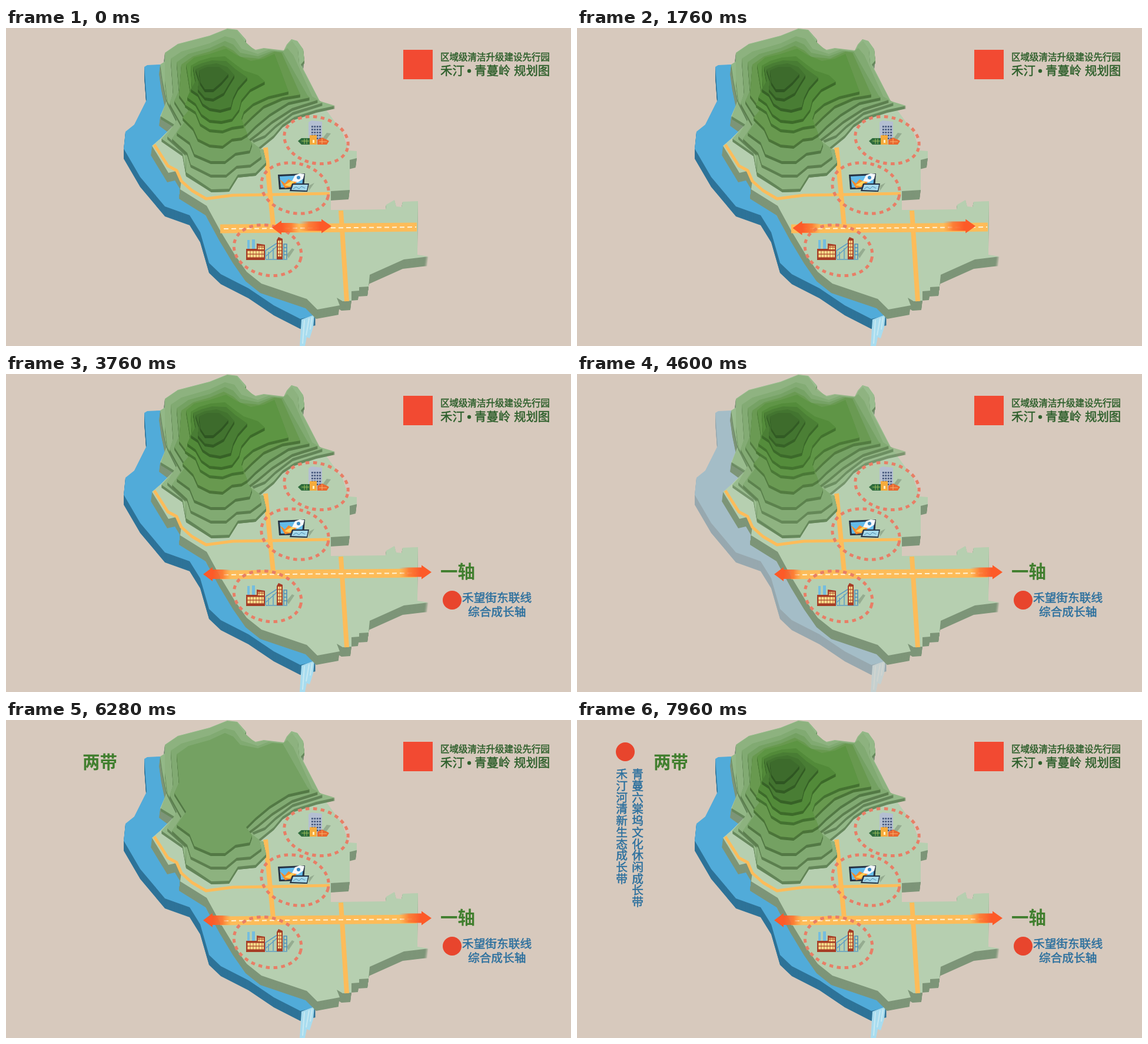
Write an HTML page that moves like this. It is 960 px wide and 540 px high and loops after 8 s.

```html
<!DOCTYPE html>
<html lang="zh-CN">
<head>
<meta charset="utf-8">
<title>规划图</title>
<style>
  html, body { margin: 0; width: 100%; height: 100%; overflow: hidden; background: #d7c9bd; }
  svg { display: block; width: 100vw; height: 100vh; font-family: 'Noto Sans CJK SC', 'Noto Sans CJK', sans-serif; }
  .road { fill: none; stroke: #fdbc59; stroke-linejoin: round; }
  .zone { fill: none; stroke: #e87e66; stroke-width: 5; stroke-dasharray: 6.5 6.5; }
  .title { fill: #2d5f2b; stroke: #2d5f2b; stroke-width: .5px; }
  .heading { fill: #417f2f; font-size: 29.5px; font-weight: 700; }
  .label { fill: #2c709e; font-size: 19.7px; }
  .label text { stroke: #2c709e; stroke-width: .5px; }
  .column { writing-mode: vertical-rl; }
  .mark { fill: #e8452d; }
</style>
</head>
<body>
<svg viewBox="0 0 960 540">
  <defs>
    <linearGradient id="fade">
      <stop offset="0" stop-color="#ff8a35" stop-opacity="0"/>
      <stop offset=".3" stop-color="#fc7430" stop-opacity=".85"/>
      <stop offset=".65" stop-color="#fd5a28"/>
    </linearGradient>
    <pattern id="windows" width="5" height="6" patternUnits="userSpaceOnUse">
      <rect x=".4" y=".6" width="4.200" height="4.800" fill="#f8df8c"/>
    </pattern>
    <pattern id="panes" x="519" y="166" width="4.400" height="5" patternUnits="userSpaceOnUse">
      <rect width="2.800" height="3" fill="#4c5d82"/>
    </pattern>
  </defs>

  <g id="river">
    <path data-depth="17" data-side="#2e7398" fill="#51abd9" d="M235 66L240 63 262 62 285 180 340 320 420 440 512 474 526 488 500 494 455 471 412 442 365 418 345 399 330 347 312 318 270 303 228 253 200 205 203 176 218 164 239 122Z"/>
    <path fill="#a8dcef" d="M502 495L524 487 522 508 516 527 511 525 508 540 499 540Z"/>
    <path fill="none" stroke="#c8e9f2" stroke-width="2" d="M507 496L504 536M515 493L510 522M520 491L517 512"/>
  </g>

  <path data-depth="16" data-slant="-2" data-side="#7d9578" fill="#b6cfb0" d="M262 62L270 57 270 42 292 27 346 13 376 1 393 3 408 20 404 26 424 37 472 38 485 19 495 22 505 36 507 55 501 62 533 124 552 150 572 178 582 208 596 209 596 221 584 224 584 275 552 277 552 309 645 308 646 300 660 292 663 303 672 304 674 295 700 294 699 385 718 388 676 393 618 419 616 439 600 440 600 446 587 447 587 463 572 464 562 458 567 471 529 478 511 460 434 434 409 414 388 384 365 346 341 302 296 274 298 258 289 243 276 246 248 200 262 188 284 166 262 150 273 124 266 90Z"/>

  <g class="road">
    <path stroke-width="5" d="M252 198L275 234 290 242 298 260 316 276 340 290 385 284 450 283 550 281"/>
    <path stroke-width="8" d="M441 203L454 336M569 310L579 464"/>
    <path stroke-width="15" d="M364 341L698 338"/>
    <path stroke="#fff3d6" stroke-width="2" stroke-dasharray="8 5" d="M370 341L697 338"/>
  </g>

  <g id="mountain">
    <path fill="#93b887" d="M262 62L270 57 270 42 292 27 346 13 376 1 393 3 408 20 404 26 424 37 438 34 472 38 477 28 485 19 495 22 505 36 507 55 501 62 533 124 559 132 527 139 490 151 470 164 455 182 428 204 437 206 442 228 424 246 394 249 379 273 349 274 306 247 300 213 264 188 286 164 263 150 273 124 266 90Z"/>
    <path fill="#8db27f" d="M270 43L292 28 346 14 376 2 392 4 405 22 424 39 438 35 473 39 479 28 486 22 496 36 498 60 531 122 538 127 487 143 458 165 440 182 418 191 430 206 437 206 442 228 424 246 394 249 379 273 349 274 306 245 305 212 274 184 290 156 274 124 270 90Z"/>
    <path fill="#81aa72" d="M280 52L298 40 346 26 372 14 388 18 400 35 428 44 446 37 470 40 478 34 488 46 520 116 530 122 486 136 452 158 428 178 412 190 430 203 434 218 415 232 392 234 374 249 348 249 314 232 308 212 282 188 298 164 278 128 284 110Z"/>
    <path fill="#74a162" d="M290 58L310 44 346 34 372 22 386 28 398 42 428 48 452 39 470 40 512 114 516 118 480 126 448 146 424 166 408 182 418 196 414 208 390 212 372 226 348 226 320 214 312 194 290 178 306 156 286 124 294 106Z"/>
    <path fill="#68994f" d="M298 62L318 48 346 40 370 30 386 38 398 49 430 52 456 40 468 42 500 113 470 118 438 132 418 150 404 164 410 180 400 186 384 188 368 200 346 198 326 188 318 170 300 152 312 138 294 114Z"/>
    <path fill="#5d9543" d="M306 62L320 50 346 44 374 35 392 46 416 56 438 52 456 44 466 70 480 108 446 116 420 128 404 142 400 154 404 165 384 168 368 174 346 172 330 162 322 142 304 130 314 112Z"/>
    <path fill="#528a39" d="M314 64L328 56 348 50 372 48 390 62 404 72 428 80 440 91 415 104 400 122 396 138 384 154 366 158 346 156 332 146 322 128 308 118 316 100Z"/>
    <path fill="#497d34" d="M318 66L332 60 350 55 374 56 390 70 410 84 394 102 386 118 382 134 364 139 346 136 334 128 326 112 314 104 322 90Z"/>
    <path fill="#42732f" d="M322 70L338 63 358 60 376 66 388 80 378 96 370 110 352 120 338 118 326 104 328 88Z"/>
    <path fill="#3d6b2c" d="M328 72L342 66 362 66 378 78 366 92 352 104 338 104 330 92Z"/>
  </g>

  <g class="zone">
    <ellipse rx="55" ry="39" transform="translate(527 190.500) rotate(14)"/>
    <ellipse rx="58" ry="42" transform="translate(491 272) rotate(14)"/>
    <ellipse rx="58" ry="42" transform="translate(444.500 377.500) rotate(14)"/>
  </g>

  <g id="office">
    <path fill="#7f957c" opacity=".6" d="M536 190L545 178 552 179 540 195Z"/>
    <path fill="#b4bfd2" d="M514 160L519 157 537 159V196H514Z"/>
    <path fill="url(#panes)" d="M519 166H536V190H519Z"/>
    <path fill="#2f6b3c" d="M496 192L502 187H516V198H502Z"/>
    <path stroke="#9fc25c" d="M502 192H515M507 188V197M511 188V197"/>
    <path fill="#f6ab3c" d="M516 182H528V198H516Z"/>
    <path fill="#fff0c2" d="M521 190H524V195H521Z"/>
    <path fill="#e9682f" d="M529 190L537 186 546 190 549 192 545 198H529Z"/>
    <path stroke="#f7b36e" d="M532 193H545M537 188V197"/>
  </g>

  <g id="screens">
    <path fill="#7f957c" opacity=".6" d="M514 268L524 263 515 276Z"/>
    <path fill="#263345" d="M462 249L508 247 506 273 464 274Z"/>
    <path fill="#63bbea" d="M465 252L505 250 503 270 467 271Z"/>
    <path fill="#f78c2a" d="M465 257L474 264 480 257 486 260 491 255 494 262 484 270 474 272Z"/>
    <path fill="#ffd35a" d="M473 267L485 260 490 261 482 269Z"/>
    <path fill="#f5f8fb" d="M486 260L491 250 499 247 507 248 505 256 496 262Z"/>
    <circle cx="497" cy="254" r="3" fill="#3d8bc5"/>
    <path fill="#263345" d="M486 264L515 264 512 278 482 277Z"/>
    <path fill="#a5d8ea" d="M488 266L513 266 511 276 485 275Z"/>
    <path fill="none" stroke="#4b8fb5" d="M488 273L493 270 498 273 502 269 508 272"/>
  </g>

  <g id="factory">
    <path fill="#7f957c" opacity=".6" d="M477 385L486 374 490 376 480 391Z"/>
    <path fill="#74bddf" d="M410 360H414V377H410ZM418 359H423V377H418Z"/>
    <path fill="#a63c25" d="M408 375H426V366L440 368V394H408Z"/>
    <path fill="url(#windows)" d="M410 378H438V390H410ZM428 370H438V376H428Z"/>
    <path fill="none" stroke="#5f9fc3" stroke-width="1.500" d="M441 392V378L461 365M441 388L461 370M446 392V380M454 392V374M441 393H478"/>
    <path fill="#a63c25" d="M460 360L463 355 470 358V393H460Z"/>
    <path fill="url(#windows)" d="M462 361H468V388H462Z"/>
    <path fill="none" stroke="#4d8fb8" stroke-width="1.500" d="M472 392V367H477V392M472 373H477M472 379H477M472 385H477"/>
  </g>

  <path id="west" fill="url(#fade)" d="M-47 -8H-16V-12L0 0-16 12V8H-47Z"/>
  <path id="east" fill="url(#fade)" d="M-55 -8H-17V-12L0 0-17 12V8H-55Z"/>

  <rect x="675" y="37" width="50" height="50" fill="#f24a32"/>
  <g class="title">
    <text x="738" y="55" font-size="15.500">区域级清洁升级建设先行园</text>
    <g font-size="20.400">
      <text x="738" y="80">禾汀</text>
      <circle cx="787" cy="73" r="3"/>
      <text x="796" y="80">青蔓岭</text>
      <text x="863" y="80">规划图</text>
    </g>
  </g>

  <text id="axis" class="heading" x="738" y="346">一轴</text>
  <g id="axisLabel" class="label">
    <circle class="mark" cx="758" cy="384" r="16"/>
    <text x="775" y="387">禾望街东联线</text>
    <text x="785" y="411">综合成长轴</text>
  </g>
  <text id="belts" class="heading" x="130" y="82">两带</text>
  <g id="beltLabels" class="label">
    <circle class="mark" cx="82" cy="54" r="16"/>
    <text class="column" x="103" y="82">青蔓六棠坞文化休闲成长带</text>
    <text class="column" x="76" y="82">禾汀河清新生态成长带</text>
  </g>
</svg>
<script>
const LOOP = 8000;
const byId = id => document.getElementById(id);
const ramp = (t, from, to) => Math.min(1, Math.max(0, (t - from) / (to - from)));
const easeInOut = u => u < .5 ? 2 * u * u : 1 - 2 * (1 - u) ** 2;
const mix = (a, b, u) => a + (b - a) * u;
const show = (element, opacity) => element.setAttribute('opacity', opacity);

// Wraps a flat face in a group with its downward side wall.
function extrude(face, side, depth, slant = 0) {
  const slab = document.createElementNS('http://www.w3.org/2000/svg', 'g');
  face.before(slab);
  for (let y = depth; y > 0; y--) {
    const wall = face.cloneNode();
    wall.style.fill = side;
    wall.setAttribute('transform', `translate(${slant * y / depth} ${y})`);
    slab.append(wall);
  }
  slab.append(face);
  return slab;
}

for (const face of document.querySelectorAll('[data-depth]')) {
  const { side, depth, slant } = face.dataset;
  extrude(face, side, +depth, slant);
}
const layers = [...byId('mountain').children].map(face =>
  extrude(face, `color-mix(in srgb, ${face.getAttribute('fill')}, #16300f 35%)`, 5));

function draw(t) {
  const spread = easeInOut(ramp(t, 900, 2260));
  byId('west').setAttribute('transform', `translate(${mix(452, 335, spread)} ${mix(339, 340, spread)}) scale(-1 1)`);
  byId('east').setAttribute('transform', `translate(${mix(553, 723, spread)} 336.5)`);

  show(byId('river'), Math.max(1 - ramp(t, 4400, 4720), ramp(t, 4950, 5350)));
  const mountainLeft = 1 - ramp(t, 4540, 4860);
  layers.forEach((layer, i) => {
    const start = 5250 + 290 * i;
    show(layer, Math.max(mountainLeft, ramp(t, start, start + 90)));
  });

  show(byId('axis'), ramp(t, 2120, 2400));
  show(byId('axisLabel'), ramp(t, 2600, 3000));
  show(byId('belts'), ramp(t, 4850, 5150));
  show(byId('beltLabels'), ramp(t, 7600, 7900));
}

function tick() {
  draw(performance.now() % LOOP);
  requestAnimationFrame(tick);
}
tick();
</script>
</body>
</html>
```
